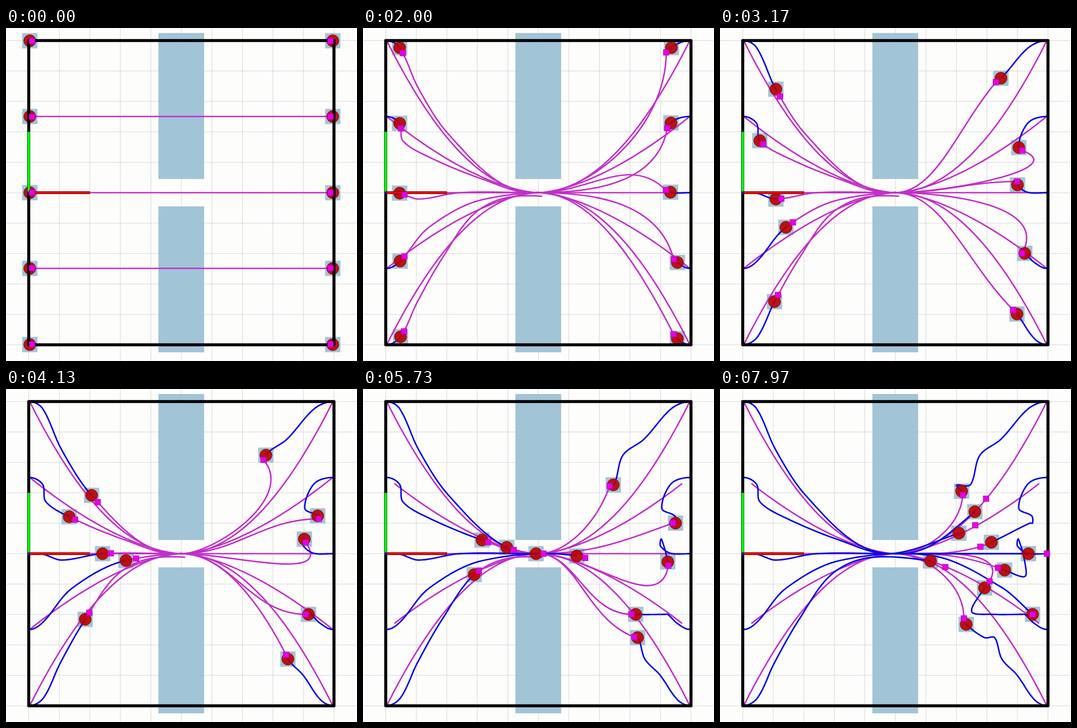
An HTML page that plays this animation: 767 by 730 pixels, repeating every 8 s.

```html
<!DOCTYPE html>
<html lang="en">
<head>
<meta charset="utf-8">
<title>Swapping sides through a gap</title>
<style>
html, body { margin: 0; width: 100%; height: 100%; overflow: hidden; background: #fdfdfc; }
svg { display: block; width: 767px; height: 730px; }
path { fill: none; stroke-linejoin: round; }
.plan { stroke: #c22fca; stroke-width: 3.2; }
.trail { stroke: #0a0ae6; stroke-width: 3.3; }
.wall { fill: #9bc0d4; fill-opacity: .93; }
.zone { fill: #a2c4d6; }
.disc { fill: #b80000; fill-opacity: .9; stroke: #8a0606; stroke-width: 1; }
.goal { fill: #e600e6; stroke: #b000b4; stroke-width: 1; }
</style>
</head>
<body>
<svg id="stage" viewBox="0 0 767 730"></svg>
<script>
const LOOP = 8000, CELL = 66.7, GATE = [383, 361], HALF = 331;
const ROWS = [28, 194, 361, 527, 694];
const KEYS = [900, 2000, 3170, 4130, 5730, 6800, 7970];
const LOOK = [200, 200, 130, 130, 100, 0, 270]; // how far ahead the subgoal lies, in ms
const stage = document.getElementById('stage');

function make(tag, attrs, parent = stage) {
  const el = document.createElementNS('http://www.w3.org/2000/svg', tag);
  set(el, attrs);
  return parent.appendChild(el);
}
function set(el, attrs) {
  for (const k in attrs) el.setAttribute(k, attrs[k]);
}
const layer = () => make('g', {});
const show = (el, on) => { el.style.display = on ? '' : 'none'; };
const mix = (a, b, f) => a + (b - a) * f;
const mixPt = (p, q, f) => [mix(p[0], q[0], f), mix(p[1], q[1], f)];
const dist = (p, q) => Math.hypot(q[0] - p[0], q[1] - p[1]);
const toPath = pts => 'M' + pts.map(p => p[0].toFixed(1) + ',' + p[1].toFixed(1)).join(' ');

// Smooth curve through points, leaving the first one horizontally.
function spline(P, steps) {
  const tangents = P.map((p, i) => {
    const a = P[Math.max(i - 1, 0)], b = P[Math.min(i + 1, P.length - 1)];
    if (i === 0) return [Math.sign(b[0] - p[0]), 0];
    const len = dist(a, p) + dist(p, b) || 1;
    return [(b[0] - a[0]) / len, (b[1] - a[1]) / len];
  });
  const out = [P[0]];
  for (let i = 0; i < P.length - 1; i++) {
    const p = P[i], q = P[i + 1], h = dist(p, q) / 3;
    for (let s = 1; s <= steps; s++) {
      const u = s / steps, v = 1 - u;
      out.push([0, 1].map(k =>
        v * v * v * p[k] + 3 * v * v * u * (p[k] + tangents[i][k] * h) +
        3 * v * u * u * (q[k] - tangents[i + 1][k] * h) + u * u * u * q[k]));
    }
  }
  return out;
}

// Key interval and fraction for a time.
function locate(t) {
  let i = 0;
  while (i < KEYS.length - 2 && t >= KEYS[i + 1]) i++;
  const f = (t - KEYS[i]) / (KEYS[i + 1] - KEYS[i]);
  return [i, Math.min(Math.max(f, 0), 1)];
}
function keyed(values, t) {
  const [i, f] = locate(t);
  return mix(values[i], values[i + 1], f);
}

// Monotone cubic travel, starting from rest.
function travel(S) {
  const d = S.slice(1).map((s, i) => (s - S[i]) / (KEYS[i + 1] - KEYS[i]));
  const m = S.map((_, i) => {
    if (i === 0) return 0;
    if (i === d.length) return d[i - 1];
    return d[i - 1] * d[i] > 0 ? 2 * d[i - 1] * d[i] / (d[i - 1] + d[i]) : 0;
  });
  return t => {
    const [i, f] = locate(t), h = KEYS[i + 1] - KEYS[i], g = 1 - f;
    return S[i] * g * g * (1 + 2 * f) + S[i + 1] * f * f * (3 - 2 * f) +
      h * f * g * (m[i] * g - m[i + 1] * f);
  };
}

// Polyline that can be cut by distance.
function track(pts) {
  const run = [0];
  for (let i = 1; i < pts.length; i++) run.push(run[i - 1] + dist(pts[i - 1], pts[i]));
  const at = s => {
    let n = 1;
    while (n < run.length - 1 && run[n] < s) n++;
    return mixPt(pts[n - 1], pts[n], Math.min((s - run[n - 1]) / (run[n] - run[n - 1] || 1), 1));
  };
  const cut = (a, b) => [at(a), ...pts.filter((_, i) => run[i] > a && run[i] < b), at(b)];
  return { run, at, cut };
}

// Scene
for (let i = 0; i < 11; i++) {
  const x = 49.7 + i * CELL, y = 27.5 + i * CELL;
  make('path', { d: `M${x},0V730`, stroke: '#d0d0cc' });
  make('path', { d: `M0,${y}H767`, stroke: '#cfcfde' });
}
for (const y of [11, 391])
  make('rect', { class: 'wall', x: 333, y, width: 100, height: 320 });

const boxes = layer(), plans = layer(), trails = layer(), discs = layer();
make('rect', { x: 49.7, y: 27.5, width: 667, height: 667, fill: 'none', stroke: '#000',
  'stroke-width': 6.6, 'stroke-linejoin': 'round' });
make('rect', { x: 47, y: 227.5, width: 5.4, height: 133, fill: '#0f0', stroke: '#0a7a0a' });
make('rect', { x: 50, y: 358.4, width: 133, height: 5.2, fill: '#e80505', stroke: '#6d0808' });
make('rect', { x: 47, y: 358.4, width: 5.4, height: 5.2, fill: '#1414b4' });
const goals = layer();

const movers = [];

// Straight row at first, then a power curve from the gate out to each side.
for (const y of ROWS) for (const side of [-1, 1]) {
  const el = make('path', { class: 'plan' }, plans);
  const rise = y - GATE[1], outer = Math.abs(rise) > 200;
  movers.push((t, planned) => {
    const far = !outer && t > 5000 ? .95 : 1, pts = [];
    for (let i = 0; i <= 24; i++) {
      const u = far * i / 24;
      const bend = planned ? u ** (outer ? 2 : 1.6) : 1;
      pts.push([GATE[0] + side * HALF * u, GATE[1] + rise * bend]);
    }
    el.setAttribute('d', toPath(pts));
  });
}

// poses: position at each key after the first, then the next subgoal.
// headings: direction of the planned curve at the subgoal, in degrees;
// without them the plan is the rest of the way to the gate.
function robot(start, poses, headings) {
  const box = make('rect', { class: 'zone', width: 33.4, height: 33.4 }, boxes);
  const plan = make('path', { class: 'plan' }, plans);
  const trail = make('path', { class: 'trail' }, trails);
  const disc = make('circle', { class: 'disc', r: 13.3 }, discs);
  const goal = make('rect', { class: 'goal', width: 12.4, height: 12.4 }, goals);

  const steps = 12, pts = spline([start, ...poses], steps), way = track(pts);
  const reach = travel(KEYS.map((_, i) => way.run[i * steps]));
  const gateAt = way.run[pts.findIndex(p => p[0] >= GATE[0])];
  const end = way.run[way.run.length - 1];

  function planPath(t, s, ahead, mark) {
    if (!headings) return toPath(way.cut(s, gateAt));
    const a = keyed(headings, t) * Math.PI / 180, pull = .4 * dist(mark, GATE);
    const c1 = [mark[0] + pull * Math.cos(a), mark[1] + pull * Math.sin(a)];
    const c2 = [mix(GATE[0], mark[0], .4), GATE[1]];
    return `${toPath(way.cut(s, ahead))}C${c1} ${c2} ${GATE}`;
  }

  movers.push((t, planned) => {
    const s = reach(t), speed = (s - reach(t - 20)) / 20;
    const ahead = Math.min(s + 5 + speed * keyed(LOOK, t), end);
    const here = way.at(s), mark = way.at(ahead);
    set(trail, { d: toPath(way.cut(0, s)) });
    set(box, { x: here[0] - 16.7, y: here[1] - 16.7 });
    set(disc, { cx: here[0], cy: here[1] });
    set(goal, { x: mark[0] - 6.2, y: mark[1] - 6.2 });

    const active = planned && (headings || s < gateAt);
    show(plan, active);
    if (active) set(plan, { d: planPath(t, s, ahead, mark) });
  });
}

const fromLeft = [
  [[80, 43], [122, 134], [187, 233], [314, 347], [436, 354], [557, 269], [591, 228]],
  [[80, 209], [87, 247], [138, 280], [260, 331], [371, 361], [522, 316], [567, 294]],
  [[80, 362], [122, 375], [211, 361], [378, 361], [512, 361], [674, 361], [716, 361]],
  [[81, 511], [144, 437], [262, 376], [467, 366], [614, 434], [683, 494]],
  [[82, 677], [119, 600], [173, 505], [243, 407], [324, 370], [460, 377], [500, 394]]
];
fromLeft.forEach((poses, i) => robot([52, ROWS[i]], poses));

const fromRight = (i, poses, headings) => robot([714, ROWS[i]], poses, headings);
fromRight(0, [[674, 43], [614, 110], [568, 145], [547, 210], [517, 211], [528, 224], [533, 244]],
  [90, 90, 130, 50, 110, 50, 95]);
fromRight(1, [[673, 208], [653, 262], [681, 278], [683, 294], [677, 294], [593, 336], [550, 353]],
  [100, 100, 20, 180, 160, 150, 165]);
fromRight(2, [[672, 360], [650, 344], [652, 329], [666, 379], [666, 411], [622, 397], [591, 386]],
  [225, 225, 180, 55, 100, 195, 200]);
fromRight(3, [[687, 514], [666, 494], [661, 494], [596, 494], [550, 488], [578, 436], [591, 419]],
  [255, 255, 300, 180, 180, 300, 300]);
fromRight(4, [[687, 681], [649, 627], [616, 592], [600, 545], [578, 545], [538, 516], [533, 503]],
  [243, 243, 225, 243, 200, 225, 270]);

function draw(t) {
  const planned = t >= KEYS[0];
  for (const move of movers) move(t, planned);
}

const start = performance.now();
function tick() {
  draw((performance.now() - start) % LOOP);
  requestAnimationFrame(tick);
}
tick();
</script>
</body>
</html>
```
